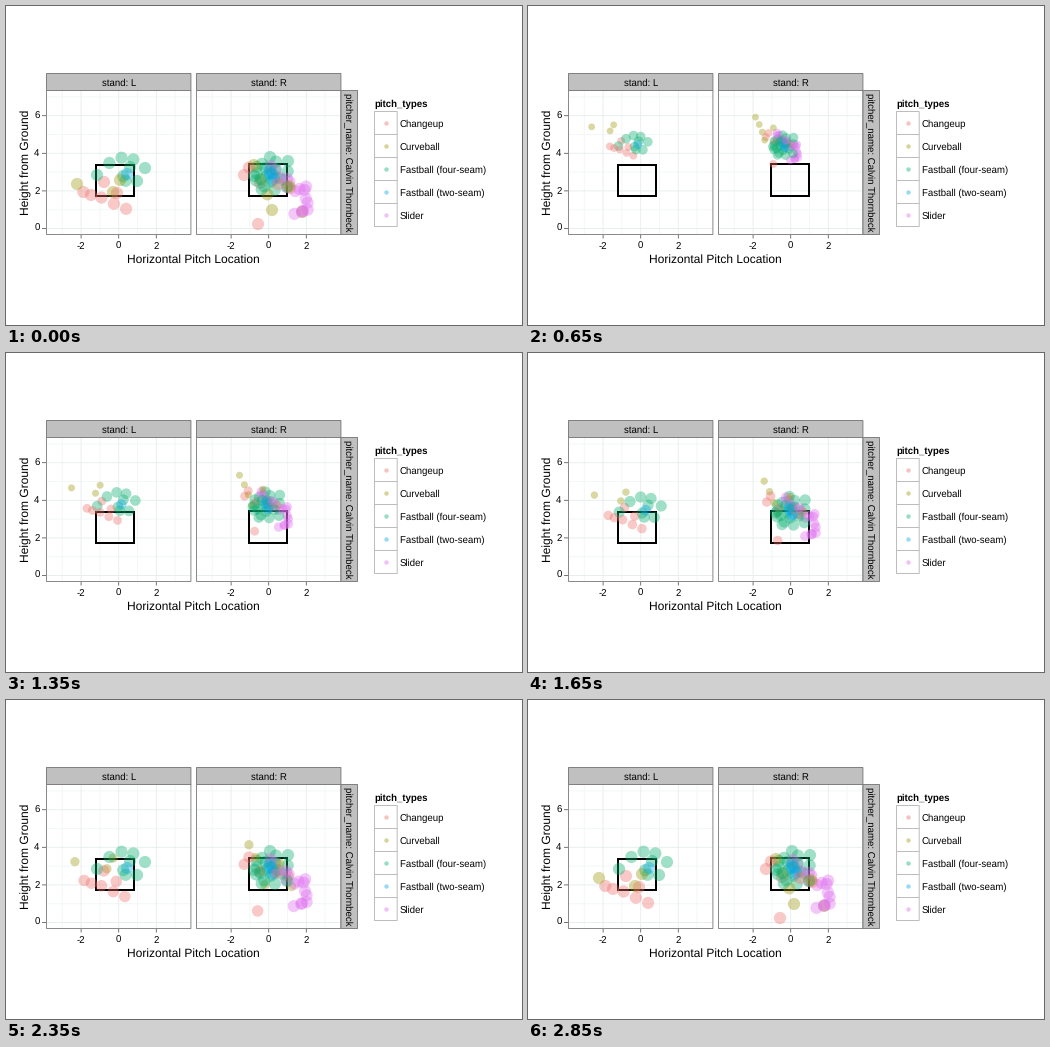
Animation, 516 px wide and 319 px high, one loop 2.95 s. Source, as a matplotlib script:

```python
import random

import matplotlib.pyplot as plt
import numpy as np
from matplotlib.animation import FuncAnimation
from matplotlib.colors import to_rgba
from matplotlib.patches import Rectangle

W, H, DPI = 516, 319, 100
PT = 72 / DPI                 # points per pixel
FT = 18.8                     # pixels per foot
GROUND = 222                  # y of height 0
CENTERS = {"L": 112.7, "R": 262.7}
TOP, BOTTOM, HALF = 84.5, 228.5, 72.2
LEAD = 17                     # flight steps before the first one shown
LAST = 29
FULL_R = 6.1
GOLDEN = np.pi * (3 - 5 ** 0.5)

# colour, arrival step, release (dx, y), acceleration (x, y), first radius, growth power
KINDS = {
    "Changeup": ("#EE726B", 25, (-34.5, 107), (-0.019, 0.045), 3.8, 2),
    "Curveball": ("#9E9A0C", 28, (-51.5, 102), (0.010, 0.079), 3.4, 4),
    "Fastball (four-seam)": ("#08AE70", 20.7, (-29.5, 107), (-0.015, 0.028), 4.6, 1.5),
    "Fastball (two-seam)": ("#08A8EA", 21, (-29.5, 107), (-0.020, 0.032), 4.3, 1.5),
    "Slider": ("#E06CF0", 23.5, (-33, 103), (0.004, 0.042), 4.1, 2),
}
CHANGE, CURVE, FOUR, TWO, SLIDER = KINDS

# groups of pitches at the plate: count, bend through three points, spread
GROUPS = [
    ("L", CHANGE, 5, (77, 186), (92, 190), (121, 203), 1),
    ("L", CHANGE, 2, (98, 176), (104, 181), (111, 187), 0),
    ("L", CURVE, 2, (107, 186), (110, 180), (114, 174), 0),
    ("L", CURVE, 1, (71, 178), (71, 178), (71, 178), 0),
    ("L", FOUR, 5, (91, 169), (116, 138), (139, 162), 0),
    ("L", FOUR, 4, (124, 161), (107, 178), (131, 175), 0),
    ("L", TWO, 1, (121, 168), (121, 168), (121, 168), 0),
    ("R", CHANGE, 3, (238, 169), (240, 150), (254, 177), 0),
    ("R", CHANGE, 2, (272, 178), (278, 180), (284, 182), 0),
    ("R", CHANGE, 1, (252, 218), (252, 218), (252, 218), 0),
    ("R", CURVE, 4, (248, 159), (260, 180), (266, 204), 0),
    ("R", CURVE, 2, (283, 180), (289, 193), (296, 206), 0),
    ("R", FOUR, 19, (258, 169), (263, 169), (268, 169), 20),
    ("R", TWO, 5, (263, 165), (266, 168), (268, 174), 2),
    ("R", SLIDER, 11, (264, 160), (275, 177), (298, 185), 5),
    ("R", SLIDER, 7, (298, 184), (308, 210), (289, 206), 2),
]

plt.rcParams.update({"font.family": "Liberation Sans", "text.hinting": "none",
                     "path.snap": False})
fig = plt.figure(figsize=(W / DPI, H / DPI), dpi=DPI, facecolor="white")
ax = fig.add_axes([0, 0, 1, 1])
ax.set_xlim(0, W)
ax.set_ylim(H, 0)
ax.axis("off")


def line(xs, ys, color, width, z=1):
    ax.plot(xs, ys, color=color, lw=width * PT, zorder=z, solid_capstyle="butt")


def box(x0, y0, x1, y1, edge, width, fill="none", z=3):
    ax.add_patch(Rectangle((x0, y0), x1 - x0, y1 - y0, facecolor=fill, edgecolor=edge,
                           lw=width * PT, zorder=z, joinstyle="miter"))


def label(x, y, text, size=9.6, ha="center", va="center_baseline", **kw):
    ax.text(x, y, text, fontsize=size * PT, ha=ha, va=va, zorder=8, **kw)


def draw_panel(side, zone):
    cx = CENTERS[side]
    x0, x1 = cx - HALF, cx + HALF
    for ft in range(-3, 8):
        major = ft % 2 == 0
        color, width = ("#e6eded", 0.9) if major else ("#f3f7f7", 1)
        z = 1.5 if major else 1
        if ft <= 3:
            line([cx + ft * FT] * 2, [TOP, BOTTOM], color, width, z)
        if ft >= 0:
            line([x0, x1], [GROUND - ft * FT + 0.5] * 2, color, width, z)
    for ft in (-2, 0, 2):
        x = cx + ft * FT
        line([x, x], [BOTTOM, BOTTOM + 4], "#555555", 0.8)
        label(x, 239.7, str(ft))
    box(*zone, "black", 2)
    box(x0, TOP, x1, BOTTOM, "#8a8a8a", 1, z=6)
    box(x0, 67.5, x1, TOP, "#808080", 1, "#c0c0c0", z=6)
    label(cx, 76.3, f"stand: {side}")


draw_panel("L", (90, 159, 128, 190))
draw_panel("R", (243, 158, 281, 190))

for ft in (0, 2, 4, 6):
    y = GROUND - ft * FT + 0.5
    line([36, 40.5], [y, y], "#555555", 0.8)
    label(33.5, y - 0.8, str(ft), ha="right")

box(335, TOP, 351.5, BOTTOM, "#808080", 1, "#c0c0c0", z=6)
label(342, 156.5, "pitcher_name: Calvin Thornbeck", rotation=-90, va="center")
label(187.5, 252.2, "Horizontal Pitch Location", 12)
label(20, 156.3, "Height from Ground", 12, rotation=90, va="center")

label(368, 97, "pitch_types", ha="left", weight="bold")
for i, (name, kind) in enumerate(KINDS.items()):
    y = 117 + 23 * i
    box(368.5, y - 11.5, 391.2, y + 11.5, "#bdbdbd", 1)
    ax.scatter([379.8], [y], s=(4.4 * PT) ** 2, color=to_rgba(kind[0], 0.42),
               linewidths=0, zorder=4)
    label(394, y + 0.2, name, ha="left")


def make_group(side, name, count, start, bend, end, spread):
    """Pitches along a quadratic curve, fanned out on a golden-angle spiral."""
    color, arrive, (dx, y0), acc, r0, power = KINDS[name]
    start, bend, end = map(np.array, (start, bend, end))
    for i in range(count):
        u = i / max(count - 1, 1)
        x, y = (1 - u) ** 2 * start + 2 * u * (1 - u) * bend + u * u * end
        reach, turn = spread * ((i + 0.5) / count) ** 0.5, GOLDEN * i
        yield (CENTERS[side] + dx, y0, x + reach * np.cos(turn), y + reach * np.sin(turn),
               arrive, *acc, r0, power, *to_rgba(color, 0.38))


pitches = [pitch for group in GROUPS for pitch in make_group(*group)]
random.Random(4).shuffle(pitches)
data = np.array(pitches)
X0, Y0, X1, Y1, ARRIVE, AX, AY, R0, POWER = data[:, :9].T

balls = ax.scatter(X1, Y1, facecolors=data[:, 9:], linewidths=0, zorder=5)


def update(n):
    # the loop opens on the closing pose, then advances every second tick
    step = LAST if n == 0 else (n - 1) // 2
    k = np.minimum(step, ARRIVE)
    t, total = k + LEAD, ARRIVE + LEAD
    sag = 0.5 * t * (total - t)
    x = X0 + (X1 - X0) * t / total - AX * sag
    y = Y0 + (Y1 - Y0) * t / total - AY * sag
    r = R0 + (FULL_R - R0) * (k / ARRIVE) ** POWER
    balls.set_offsets(np.column_stack([x, y]))
    balls.set_sizes((2 * r * PT) ** 2)
    return (balls,)


anim = FuncAnimation(fig, update, frames=59, interval=50, repeat=True, repeat_delay=0)
plt.show()
```
